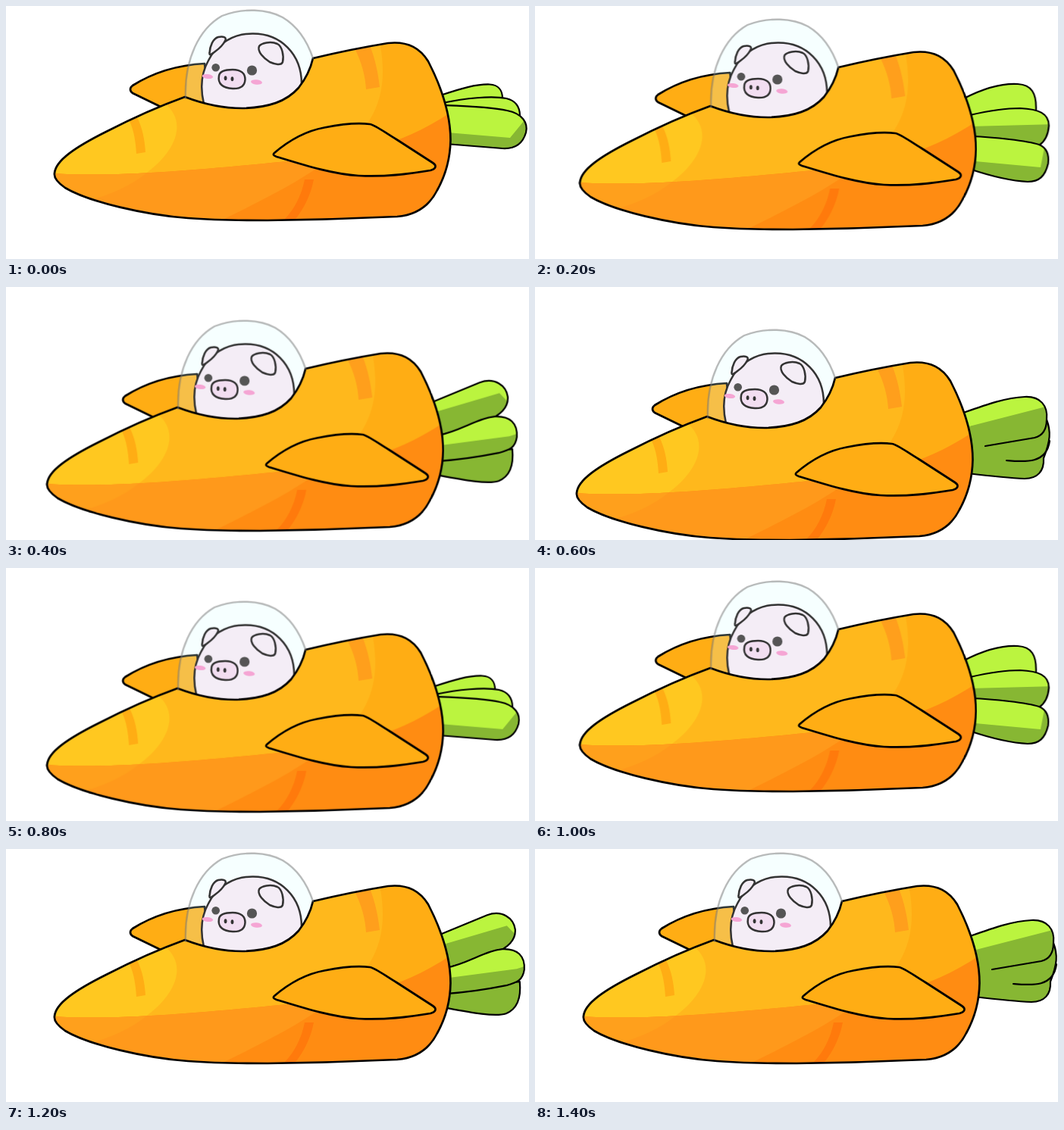
An HTML page that plays this animation: 690 px wide and 334 px high, repeating every 1600 ms.

```html
<!DOCTYPE html>
<html lang="en">
<head>
<meta charset="utf-8">
<title>Carrot ship</title>
<style>
  html, body { margin: 0; width: 100%; height: 100%; overflow: hidden; background: #fff; }
  svg { display: block; width: 100%; height: 100%; }
  .line { fill: none; stroke: #000; stroke-width: 2.7; stroke-linejoin: round; stroke-linecap: round; }
  .wing { fill: #ffad14; }
  .pig { fill: #f4edf6; stroke: #333; stroke-width: 2.5; }
  .nose { fill: #f2def1; }
  .dark { fill: #555; }
  .cheek { fill: #f5a5d4; }
  .glass { stroke: #777; stroke-opacity: .5; stroke-width: 2.4; }
  .petal { fill: #bbf43f; }
  .edge { stroke-width: 2.2; }
  .shade { fill: #87b733; }

  #ship { animation: bob 1600ms step-end infinite; }
  @keyframes bob {
    0%, 75%, 100% { transform: translate(0, 0); }
    12.5%, 62.5% { transform: translate(-4.7px, 12px); }
    25%, 50% { transform: translate(-9.8px, 38.8px); }
    37.5% { transform: translate(-9px, 51px); }
  }
  .leaf { visibility: hidden; animation: flick 800ms step-end infinite; }
  @keyframes flick {
    0% { visibility: visible; }
    25%, 100% { visibility: hidden; }
  }
  .leaf:nth-child(2) { animation-delay: -600ms; }
  .leaf:nth-child(3) { animation-delay: -400ms; }
  .leaf:nth-child(4) { animation-delay: -200ms; }
</style>
</head>
<body>
<svg viewBox="0 0 690 334">
  <defs>
    <path id="hull" d="M64 221C65 204 92 186 132 166C165 149 200 133 236 120C262 130 288 135 312 135C347 134 370 126 386 108C397 94 402 82 405 69Q455 57 504 49C532 46 547 57 557 73C575 108 586.5 142 586.5 177C586 205 579 225 569 243C558 265 541 276 516 278Q430 282 345 283Q280 283 240 280C185 276 110 259 78 240C68 233 63 227 64 221Z"/>
    <path id="dome" d="M237 122C235 70 255 30 285 13C313 2 345 4 365 15C385 27 397 45 405 69"/>
    <path id="low" d="M50 220C130 228 260 216 360 206C455 199 525 186 600 131V300H50Z"/>
    <path id="mid" d="M0 0H480C512 95 502 153 424 204C384 235 320 265 270 290H0Z"/>
    <path id="tip" d="M0 0H150L209 128C240 153 224 191 187 219C165 238 135 250 105 258L0 300Z"/>
    <clipPath id="inHull"><use href="#hull"/></clipPath>
    <clipPath id="inLow"><use href="#low"/></clipPath>
  </defs>

  <g id="ship">
    <g id="leaves"></g>

    <path class="line wing" d="M202 132L167 115C163 112 163 108 167 105C194 88 225 78 262 76L270 140Z"/>
    <use href="#dome" fill="#d6ffff" fill-opacity=".22"/>
    <path fill="#d6ffff" fill-opacity=".22" d="M237 122L405 69L390 140H240Z"/>

    <path class="line pig" d="M261 129C256 108 258 88 267 72C278 49 301 36.5 325 36.5C362 36 390 63 390 103L370 140H270Z"/>
    <path class="line pig" d="M268.5 62C269 53 273 43 280 41C286 39.500 292 41 289 46C286 52 283 55 276 60C271 64 268 66 268.500 62Z"/>
    <path class="line pig" d="M334 53C337 49 349 46 358 50C364 53 367 65 365 74C363 79 355 77 348 74C340 69 331 60 334 53Z"/>
    <circle class="dark" cx="276.7" cy="81.3" r="5.3"/>
    <circle class="dark" cx="324.5" cy="85" r="6.6"/>
    <ellipse class="cheek" cx="266" cy="93" rx="7.2" ry="3" transform="rotate(6 266 93)"/>
    <ellipse class="cheek" cx="330.5" cy="100.5" rx="7.5" ry="3.2" transform="rotate(6 330.5 100.5)"/>
    <path class="line pig nose" d="M281 92C282 86 290 84 299 84C310 84 315.500 89 315.500 97C315 106 309 109.500 299 109C286 108 279 103 281 92Z"/>
    <ellipse cx="289.6" cy="95.3" rx="1.9" ry="3" fill="#333"/>
    <ellipse cx="298.5" cy="96.3" rx="1.9" ry="3" fill="#333"/>

    <g clip-path="url(#inHull)">
      <path fill="#ffad14" d="M0 0H690V334H0Z"/>
      <use href="#mid" fill="#ffb81c"/>
      <use href="#tip" fill="#ffc820"/>
      <g clip-path="url(#inLow)">
        <path fill="#ff8c12" d="M0 0H690V334H0Z"/>
        <use href="#mid" fill="#ff991b"/>
        <use href="#tip" fill="#ffa01c"/>
      </g>
      <path fill="#ffad14" d="M163 152C169 165 171 179 172 195L184 193C183 176 180 161 173 147Z"/>
      <path fill="#ff9f1c" d="M460 56C469 74 474 92 475 110L493 107C491 88 487 70 480 52Z"/>
      <path fill="#ff7a0c" d="M394 229H406C402 250 393 268 379 285H364C380 270 390 250 394 229Z"/>
    </g>
    <use href="#hull" class="line"/>
    <use href="#dome" class="line glass"/>
    <path class="line wing" d="M354 194C375 176 398 164.500 420 160.500C445 155.500 465 154 480 156C487 157 500 167 515 176L563 207C569 211 567 215 560 217C530 222 500 226 465 224C430 222 390 209 357 199C352 197 352 196 354 194Z"/>
  </g>
</svg>
<script>
  // Each leaf pose: offset, then petals as [outline, shaded area, inner lines]
  const poses = [
    [0, 0,
      ["M576 117C600 109 620 103 638 103.5C650 104 655 112 655 122L580 140"],
      ["M576 128C605 122 640 118 660 122C673 125 678 133 678 145L580 150"],
      ["M576 131C605 132 640 133 661 138C682 142 689 155 686 167C682 181 672 189 655 188L580 182", "M570 166L665 174L688 146V200H570Z"]],
    [4.7, -12,
      ["M566 122C595 107 620 102 637 103C655 104 662 115 661 138L575 150"],
      ["M574 144C600 138 625 135 640 135C665 136 678 142 678 158C677 172 671 180 665 184L575 180", "M570 159L690 156V200H570Z"],
      ["M576 172C605 173 650 178 665 183C677 188 678 200 677 208C673 225 665 232 650 232C630 231 600 224 576 216", "M570 204L667 213L673 182H690V240H570Z"]],
    [9.8, -38.8,
      ["M668 214C670 235 665 250 650 256C635 261 600 254 568 248L570 222Z", "M560 200H690V270H560Z"],
      ["M562 152L625 126C645 119 660 130 662 145C663 160 650 170 635 176C615 184 595 190 570 196", "M560 167L651 140L670 160V200H560Z"],
      ["M570 196C600 190 622 173 645 171C665 170 675 180 674 198C672 212 665 215 650 219C625 224 600 228 570 230", "M565 210L664 197L680 192V240H565Z"]],
    [0, 0,
      ["M574 115C605 104 630 95 655 94C676 93 686 106 684 124C690 140 689 152 680 175C681 192 672 202 655 202C630 201 605 198 580 195",
       "M570 136L679 108L690 100V210H570Z",
       "M603 159L668 148C680 145 684 136 684 124M631 178C655 180 684 183 688 152"]]
  ];

  const clipped = ([edge, shade, inner = ""], id) => `
    <clipPath id="${id}"><path d="${edge}"/></clipPath>
    <path class="petal" d="${edge}"/>
    ${shade ? `<path class="shade" clip-path="url(#${id})" d="${shade}"/>` : ""}
    <path class="line edge" d="${edge}${inner}"/>`;

  document.getElementById("leaves").innerHTML = poses.map(([x, y, ...petals], i) =>
    `<g class="leaf"><g transform="translate(${x} ${y})">${
      petals.map((p, j) => clipped(p, `petal${i}${j}`)).join("")}</g></g>`).join("");
</script>
</body>
</html>
```
